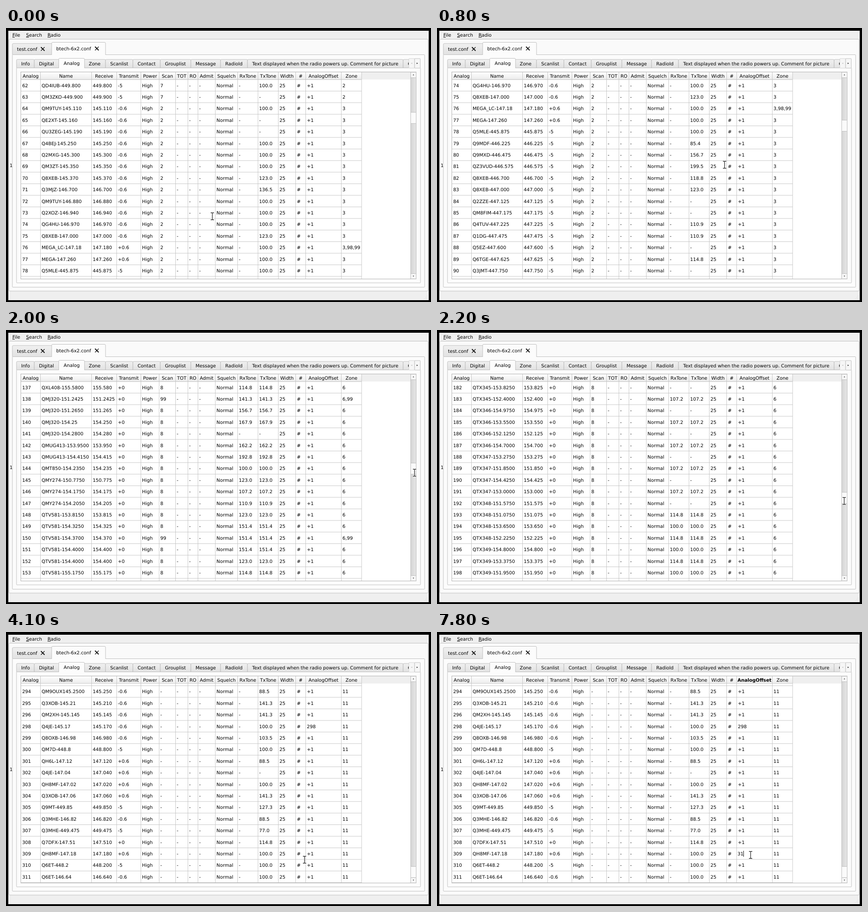
Animation, 931 px wide and 601 px high, one loop 8 s. Source, as an HTML page:

```html
<!DOCTYPE html>
<html lang="en">
<head>
<meta charset="utf-8">
<title>Radio channel editor</title>
<style>
html, body { margin: 0; width: 100%; height: 100%; overflow: hidden; background: #000; }
svg { display: block; width: 931px; height: 601px; }
text { font: 10.16px "DejaVu Sans", sans-serif; text-rendering: geometricPrecision; white-space: pre; }
.u { text-decoration: underline; }
.mid { text-anchor: middle; }
.bold { font-weight: bold; }
</style>
</head>
<body>
<svg viewBox="0 0 931 601">
  <defs>
    <linearGradient id="tab" x2="0" y2="1"><stop stop-color="#f0f0f0"/><stop offset="1" stop-color="#e2e2e2"/></linearGradient>
    <linearGradient id="head" x2="0" y2="1"><stop stop-color="#fdfdfd"/><stop offset="1" stop-color="#ededed"/></linearGradient>
    <linearGradient id="groove"><stop stop-color="#d6d6d6"/><stop offset="1" stop-color="#e6e6e6"/></linearGradient>
    <clipPath id="view"><rect x="32" y="113" width="854" height="437"/></clipPath>
    <clipPath id="tabView"><rect x="20" y="60" width="862" height="30"/></clipPath>
  </defs>
  <g id="chrome"></g>
  <g id="rows" clip-path="url(#view)"></g>
  <g id="header"></g>
  <g id="bar"></g>
  <g id="cursor" fill="none">
    <path d="M-3.5-7.6h2.6l.9.7.9-.7h2.6M0-7v14M-3.5 7.6h2.6l.9-.7.9.7h2.6" stroke="#fff" stroke-width="2.6"/>
    <path d="M-3.5-7.6h2.6l.9.7.9-.7h2.6M0-7v14M-3.5 7.6h2.6l.9-.7.9.7h2.6" stroke="#000" stroke-width="1.1"/>
  </g>
</svg>
<script>
const PITCH = 25.4, TOP = 113, LOOP = 8000, BORDER = '#b9b9b9', GRID = '#c2c2c2';
const edges = [32.5, 75.5, 187.5, 242.5, 295.5, 335.5, 371.5, 398.5, 420.5, 458.5, 507.5, 552, 596.5, 634.5, 656.5, 734.5, 779];
const titles = 'Analog Name Receive Transmit Power Scan TOT RO Admit Squelch RxTone TxTone Width # AnalogOffset Zone'.split(' ');
const OFFSET = titles.indexOf('AnalogOffset');

// Each entry: name, shift, tone, then optional scan, zone, offset.
const sections = [
  { id: 62, scan: 7, zone: 2, list: `QD4IUB-449.800 -5 100.0|QM3ZKO-449.900 -5 -` },
  { id: 64, scan: 2, zone: 3, list: `QM9TUY-145.110 -0.6 100.0|QE2XT-145.160 -0.6 -|QU3ZEG-145.190 -0.6 -
|Q4BEJ-145.250 -0.6 100.0|Q2MXG-145.300 -0.6 100.0|QM3ZT-145.350 -0.6 100.0|Q8XEB-145.370 -0.6 123.0
|Q3MJZ-146.700 -0.6 136.5|QM9TUY-146.880 -0.6 100.0|Q2XOZ-146.940 -0.6 100.0|QG4HU-146.970 -0.6 100.0
|Q8XEB-147.000 -0.6 123.0|MEGA_LC-147.18 +0.6 100.0 2 3,98,99|MEGA-147.260 +0.6 100.0|Q5MLE-445.875 -5 100.0
|Q9MDF-446.225 -5 85.4|Q9MXD-446.475 -5 156.7|QZ3VUD-446.575 -5 199.5|Q8XEB-446.700 -5 118.8
|Q8XEB-447.000 -5 123.0|Q2ZZE-447.125 -5 -|QM8FIM-447.175 -5 -|Q4TUV-447.225 -5 110.9
|Q1DG-447.475 -5 110.9|Q5EZ-447.600 -5 -|Q6TGE-447.625 -5 114.8|Q3JMT-447.750 -5 -` },
  { id: 137, scan: 8, zone: 6, rx: true, list: `QXL408-155.5800 +0 114.8|QMJ320-151.2425 +0 141.3 99 6,99
|QMJ320-151.2650 +0 156.7|QMJ320-154.25 +0 167.9|QMJ320-154.2800 +0 -|QMUG413-153.9500 +0 162.2
|QMUG413-154.4150 +0 192.8|QMT850-154.2350 +0 100.0|QMY274-150.7750 +0 123.0|QMY274-154.1750 +0 107.2
|QMY274-154.2050 +0 110.9|QTV581-153.8150 +0 123.0|QTV581-154.3250 +0 151.4|QTV581-154.3700 +0 151.4 99 6,99
|QTV581-154.4000 +0 151.4|QTV581-154.4000 +0 123.0|QTV581-155.1750 +0 114.8` },
  { id: 270, scan: '-', zone: 11, list: `QD5ZTE448.0000 -5 100.0|QE4ZT-449.225 -5 107.2|QM8FXE145.4300 -0.6 -
|Q3ML-146.62 -0.6 156.7|QD8TF-444.875 +5 100.0|QM2OU-449.375 -5 107.2|QM2OU-145.29 -0.6 107.2
|QE4ZT-449.375 -5 107.2|Q4EBX-145.37 -0.6 131.8|QM3ELO448.8250 -5 107.2|Q5FTU-442.45 +5 100.0
|Q2MLJ-146.64 -0.6 127.3|Q9XHO-447.95 -5 100.0|Q6HUD-449.825 -5 100.0|Q6HUD-147.36 +0.6 100.0
|QE5DO-146.92 -0.6 123.0|QE5DO-444.6 +5 100.0` },
  { id: 294, scan: '-', zone: 11, list: `QM9OUX145.2500 -0.6 88.5|Q3XOB-145.21 -0.6 141.3|QM2XH-145.145 -0.6 141.3` },
  { id: 298, scan: '-', zone: 11, list: `Q4JE-145.17 -0.6 100.0 - 11 298|Q8OXB-146.98 -0.6 103.5|QM7D-448.8 -5 100.0
|QH6L-147.12 +0.6 88.5|Q4JE-147.04 +0.6 -|QH8MF-147.02 +0.6 100.0|Q3XOB-147.06 +0.6 141.3|Q9MT-449.85 -5 127.3
|Q3MHE-146.82 -0.6 88.5|Q3MHE-449.475 -5 77.0|Q7DFX-147.51 +0 114.8|QH8MF-147.18 +0.6 100.0
|Q6ET-448.2 -5 100.0|Q6ET-146.64 -0.6 100.0` }
];

const channels = new Map();
function addChannel(id, entry, { scan, zone, rx }) {
  const [name, shift, tone, ownScan = scan, ownZone = zone, offset = '+1'] = entry.trim().split(' ');
  const receive = (+name.match(/\d{3}\.\d+$/)[0]).toFixed(4).replace(/0$/, '');
  channels.set(id, [id, name, receive, shift, 'High', ownScan, '-', '-', '-', 'Normal',
    rx ? tone : '-', tone, 25, '#', offset, ownZone]);
}
for (const s of sections) s.list.split('|').forEach((entry, i) => addChannel(s.id + i, entry, s));

// Channels that only fly past while scrolling.
const tones = ['100.0', '123.0', '107.2', '114.8', '151.4', '-'];
for (let id = 61; id < 294; id++) {
  if (channels.has(id)) continue;
  const hash = id * 7919 % 997, simplex = id > 100 && id < 215;
  const freq = (simplex ? 151 + hash % 160 / 40 : 145 + hash % 110 / 50).toFixed(simplex ? 4 : 3);
  const call = simplex ? 'QTX' + (300 + (id >> 2)) : 'Q' + id % 9 + 'XZ' + 'BEGTU'[id % 5];
  addChannel(id, `${call}-${freq} ${simplex ? '+0' : '-0.6'} ${tones[hash % 6]}`,
    { scan: id < 100 ? 2 : id < 215 ? 8 : '-', zone: id < 100 ? 3 : id < 137 ? 5 : id < 215 ? 6 : 10, rx: simplex });
}
const ids = [...channels.keys()].sort((a, b) => a - b);

// Time, first channel, pointer x and y.
const steps = [
  [0, 62, 452, 413], [100, 62, 468, 405], [300, 65, 478, 398], [500, 68, 520, 374], [600, 71, 562, 348],
  [700, 71, 600, 322], [800, 74, 630, 300], [900, 74, 700, 275], [1000, 74, 770, 252], [1100, 74, 830, 235],
  [1200, 74, 875, 225], [1300, 74, 897, 221], [1500, 78, 897, 227], [1600, 86, 897, 239], [1700, 97, 896, 254],
  [1800, 110, 896, 273], [1900, 123, 895, 292], [2000, 137, 895, 313], [2100, 156, 894, 339], [2200, 182, 892, 375],
  [2300, 210, 890, 415], [2400, 243, 887, 461], [2500, 270, 884, 499], [4100, 294, 654, 499.5], [4200, 294, 672, 501.5],
  [4400, 294, 680, 495], [4500, 294, 687, 489], [4700, 294, 687, 489], [7800, 294, 687, 489]
];

const $ = id => document.getElementById(id);
const rect = (x, y, w, h, fill, stroke = 'none', r = 0) =>
  `<rect x="${x}" y="${y}" width="${w}" height="${h}" fill="${fill}" stroke="${stroke}" stroke-width=".9" rx="${r}"/>`;
const text = (x, y, s, cls = '', fill = '#000') => `<text x="${x}" y="${y}" class="${cls}" fill="${fill}">${s}</text>`;
const path = (d, stroke, width = .9, fill = 'none') => `<path d="${d}" stroke="${stroke}" stroke-width="${width}" fill="${fill}"/>`;
const arrow = (x, y, dx, dy, fill) =>
  path(`M${x + dx} ${y + dy}L${x - dx + dy} ${y - dy + dx}L${x - dx - dy} ${y - dy - dx}Z`, 'none', 0, fill);
const tab = (l, r, t, b, fill) => path(`M${l} ${b}V${t + 2}q0-2 2-2H${r - 2}q2 0 2 2V${b}`, BORDER, .9, fill);
const cross = (x, y) => path(`M${x - 4} ${y - 4}l8 8`, '#111', 2) + path(`M${x + 4} ${y - 4}l-8 8`, '#111', 1.3);

function drawChrome() {
  const tabs = ['Info', 'Digital', 'Analog', 'Zone', 'Scanlist', 'Contact', 'Grouplist', 'Message', 'RadioId',
    'Text displayed when the radio powers up. Comment for picture', 'Comment'];
  const tabEdges = [23, 62, 116.5, 171, 218, 278, 338, 405, 470, 529, 870, 930];
  let s = rect(5, 6, 921, 591, '#efefef');
  [['File', 14], ['Search', 44], ['Radio', 91]].forEach(([name, x]) =>
    s += text(x, 18.7, `<tspan class="u">${name[0]}</tspan>${name.slice(1)}`));
  s += rect(6.5, 24.5, 918, 552.5, '#fafafa', BORDER, 2) + text(8, 305, '1');
  s += tab(14, 101, 34, 58.5, 'url(#tab)') + rect(14, 58.5, 903, 510, '#fcfcfc', BORDER, 1);
  s += tab(100, 218, 31.5, 59, '#fcfcfc') + text(24, 49.7, 'test.conf') + text(110, 48.7, 'btech-6x2.conf');
  s += cross(80.5, 46) + cross(199, 45);
  s += '<g clip-path="url(#tabView)">';
  tabs.forEach((name, i) => {
    if (i !== 2) s += tab(tabEdges[i], tabEdges[i + 1], 69, 87.5, 'url(#tab)') + text(tabEdges[i] + 10.2, 82, name);
  });
  s += '</g>' + rect(23, 87.5, 885, 471.5, '#fcfcfc', BORDER, 1);
  s += tab(115.5, 172, 66.5, 88, '#fcfcfc') + text(126.3, 81.2, 'Analog');
  s += rect(882.5, 67, 12.5, 21, '#f6f6f6', '#d0d0d0', 1) + rect(895, 67, 12.5, 21, '#f6f6f6', BORDER, 1);
  s += arrow(888.5, 77.5, -1.5, 0, '#c4c4c4') + arrow(901, 77.5, 1.5, 0, '#222');
  s += rect(32.5, 96.5, 866, 454, '#fff', '#aaa') + rect(779, 97, 107, 16, '#efefef');
  for (let i = 0; i < 3; i++) for (let j = 0; j <= i; j++) s += rect(922 - 3 * j, 587 + 3 * i - 0, 1, 1, '#d2d2d2');
  $('chrome').innerHTML = s;
}

function drawHeader(bold) {
  let s = rect(33, 97, 746, 15.6, 'url(#head)') + path('M33 112.8H779', GRID);
  titles.forEach((name, i) => {
    s += path(`M${edges[i + 1]} 97V113`, GRID);
    s += text((edges[i] + edges[i + 1]) / 2, 109, name, bold && i === OFFSET ? 'mid bold' : 'mid');
  });
  $('header').innerHTML = s;
}

function drawRows(first, selected, editing) {
  const start = ids.indexOf(first), shift = first === 294 ? 4.8 : 0;
  let s = '';
  for (let k = -1; k < 18; k++) {
    const cells = channels.get(ids[start + k]);
    if (!cells) continue;
    const y = TOP + shift + k * PITCH, active = cells[0] === 309;
    if (active && selected) s += rect(656.9, y + .4, 77.2, PITCH - .4, '#308cc6');
    cells.forEach((value, i) => {
      const here = active && i === OFFSET;
      if (here && editing) s += text(658.3, y + 16.6, '31') + path(`M671.6 ${y + 6.5}v13`, '#000', 1);
      else s += text(edges[i] + (i ? 2.6 : 2.9), y + 16.6, value, '', here && selected ? '#fff' : '#000');
    });
    s += path(`M32 ${y + PITCH}H779`, GRID);
  }
  for (const x of edges.slice(1)) s += path(`M${x} 113V550`, GRID);
  $('rows').innerHTML = s;
}

function drawBar(first) {
  const y = Math.min(514.3, 185 + 1.425 * (first - 62));
  $('bar').innerHTML = rect(886.5, 97, 12, 453, 'url(#groove)', BORDER)
    + rect(886.5, 97, 12, 12, '#f7f7f7', BORDER) + rect(886.5, 538.8, 12, 11.4, '#f7f7f7', BORDER)
    + arrow(892.5, 102.5, 0, -1.3, '#333') + arrow(892.5, 544.5, 0, 1.3, '#333')
    + rect(886.5, y, 12, 24.4, '#fafafa', BORDER, 1);
}

let shown;
function frame(now) {
  const time = now % LOOP;
  const step = steps.findLast(s => s[0] <= time);
  if (step !== shown) {
    shown = step;
    const [at, first, x, y] = step;
    drawHeader(at >= 4700);
    drawRows(first, at === 4700, at === 7800);
    drawBar(first);
    $('cursor').setAttribute('transform', `translate(${x} ${y})`);
  }
  requestAnimationFrame(frame);
}
drawChrome();
frame(0);
</script>
</body>
</html>
```
